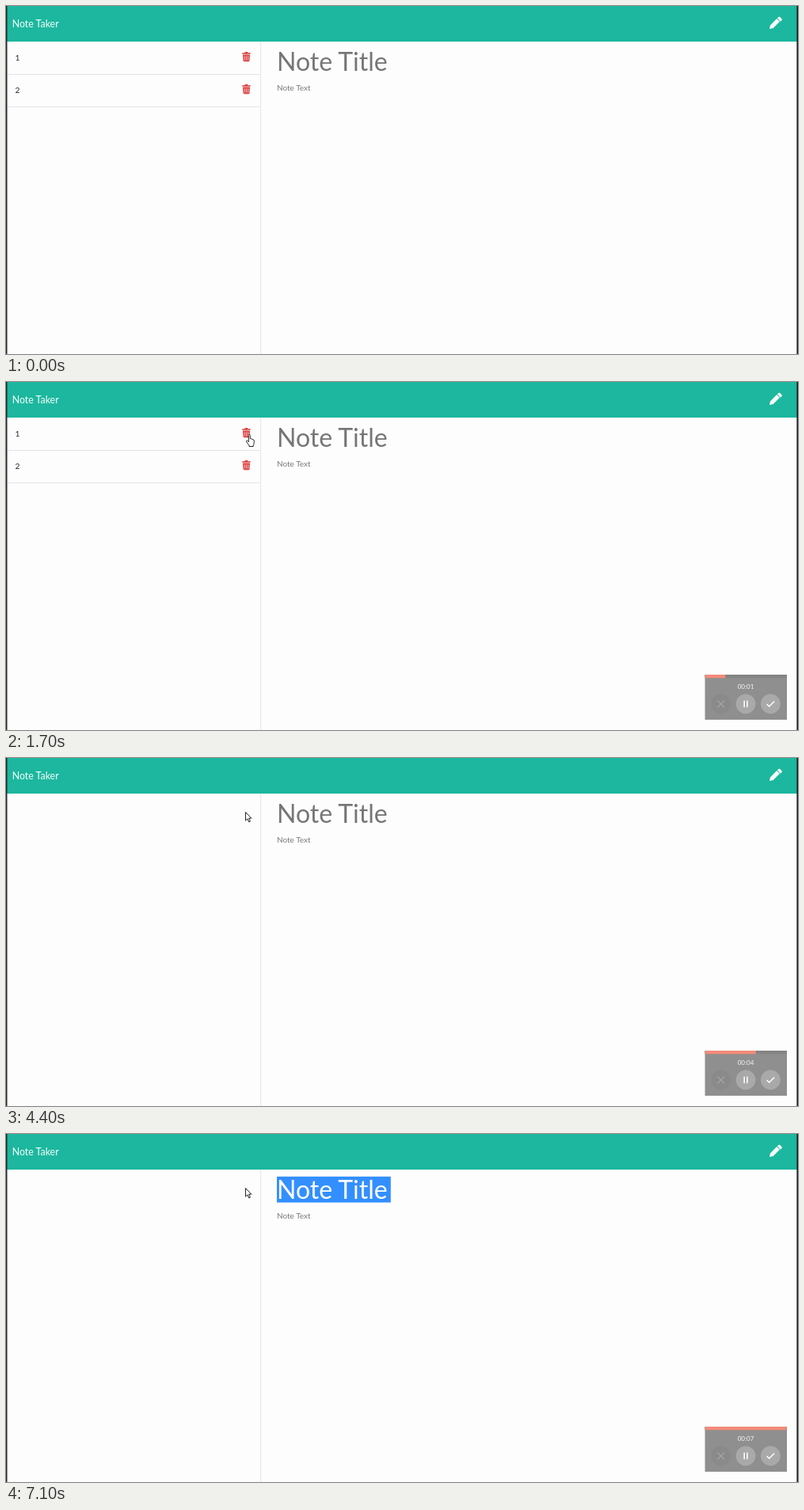
Animation, 1000 px wide and 440 px high, one loop 7.2 s. Source, as an HTML page:

```html
<!DOCTYPE html>
<html lang="en">
<head>
<meta charset="utf-8">
<title>Note Taker</title>
<style>
  html, body { margin: 0; width: 100%; height: 100%; overflow: hidden; background: #fefdfe; }
  svg { display: block; width: 100vw; height: 100vh; }
  text { font-family: Lato, "Open Sans", sans-serif; }

  .brand { font-size: 12.4px; fill: #f4fffc; }
  .title { font-size: 32px; fill: #757677; }
  .body { font-size: 10px; fill: #77797b; }
  .item { font-size: 10.3px; fill: #25282c; }
  .time { font-size: 8px; fill: #f6f6f6; text-anchor: middle; }
  .rule { fill: #e3e4e8; }

  .anim { animation: 7.2s step-end infinite; }
  .first { animation-name: first; }
  .second { animation-name: second; }
  .plain { animation-name: plain; }
  .marked { animation-name: marked; }
  .panel { animation-name: panel; }
  .pointer { animation-name: pointer; }
  .arrow { animation-name: arrow; }
  .hand { animation-name: hand; }
  .ticks { animation-name: ticks; }
  .bar { animation: bar 7.2s steps(72) infinite; transform-origin: 883px 0; }

  @keyframes first { 0% { opacity: 1 } 38.889%, 100% { opacity: 0 } }
  @keyframes second {
    0% { opacity: 1; transform: translateY(41px) }
    38.889% { opacity: 1; transform: none }
    59.722%, 100% { opacity: 0; transform: none }
  }
  @keyframes plain { 0% { opacity: 1 } 62.5%, 100% { opacity: 0 } }
  @keyframes marked { 0% { opacity: 0 } 62.5%, 100% { opacity: 1 } }
  @keyframes panel { 0% { opacity: 0 } 2.778%, 100% { opacity: 1 } }
  @keyframes pointer {
    0% { transform: translate(290px, 22px) }
    12.5% { transform: translate(290px, 22px); animation-timing-function: steps(6) }
    20.833%, 100% { transform: translate(302px, 68px) }
  }
  @keyframes arrow {
    0% { opacity: 0 }
    4.167% { opacity: 1 }
    20.833% { opacity: 0 }
    59.722%, 100% { opacity: 1 }
  }
  @keyframes hand {
    0% { opacity: 0 }
    20.833% { opacity: 1 }
    59.722%, 100% { opacity: 0 }
  }
  @keyframes bar { from { transform: scaleX(.008) } to { transform: scaleX(1.008) } }
  @keyframes ticks {
    0% { transform: none }
    13.889% { transform: translateY(-20px) }
    27.778% { transform: translateY(-40px) }
    41.667% { transform: translateY(-60px) }
    55.556% { transform: translateY(-80px) }
    69.444% { transform: translateY(-100px) }
    83.333% { transform: translateY(-120px) }
    97.222%, 100% { transform: translateY(-140px) }
  }
</style>
</head>
<body>
<svg viewBox="0 0 1000 440" preserveAspectRatio="none">
  <defs>
    <g id="trash">
      <path fill="#df3f3f" d="M298.2 59.2h3.1l.7-1.2h2.9l.7 1.2h3.1v1.6h-10.5z M299 61.6h9l-.6 7.4q-.1 1.2-1.2 1.2h-5.4q-1.1 0-1.2-1.2z"/>
      <path stroke="#fbdcdc" stroke-width=".8" d="M301.3 63.2v5.4M303.5 63.2v5.4M305.7 63.2v5.4"/>
    </g>
    <clipPath id="slot"><rect x="915" y="378" width="38" height="13"/></clipPath>
  </defs>

  <rect width="1000" height="440" fill="#fefdfe"/>
  <rect width="1000" height="45" fill="#1cb79e"/>
  <text class="brand" x="7.7" y="26.5">Note Taker</text>
  <path fill="#f6fffc" d="M964 29l.9-4.6 8.3-8.3 3.7 3.7-8.3 8.3z M974 15.2l1.1-1.1q1.1-1 2.2 0l2 2q1 1.1 0 2.2l-1.5 1.4z"/>

  <rect class="rule" x="321.2" y="45" width="1" height="395"/>

  <g class="anim first">
    <text class="item" x="11.6" y="69.3">1</text>
    <use href="#trash"/>
    <rect class="rule" x="2" y="86" width="319" height="1"/>
  </g>
  <g class="anim second">
    <text class="item" x="11.6" y="69.3">2</text>
    <use href="#trash"/>
    <rect class="rule" x="2" y="86" width="319" height="1"/>
  </g>

  <text class="title anim plain" x="342" y="81.8">Note Title</text>
  <g class="anim marked">
    <rect x="342" y="53.8" width="143.8" height="32.8" fill="#338fff"/>
    <text class="title" x="342" y="81.8" style="fill:#fff">Note Title</text>
  </g>
  <text class="body" x="342" y="106.8">Note Text</text>

  <g class="anim panel">
    <rect x="882.5" y="370" width="103.5" height="57" fill="#8f8f8f"/>
    <rect x="882.5" y="370" width="103.5" height="4.3" fill="#848484"/>
    <rect class="bar" x="883" y="370" width="103" height="4.3" fill="#f38b79"/>
    <g clip-path="url(#slot)"><g id="ticks" class="anim ticks"></g></g>
    <circle cx="902.8" cy="407" r="12.4" fill="#8a8a8a"/>
    <circle cx="934" cy="407" r="12.4" fill="#a9a9a9"/>
    <circle cx="965.3" cy="407" r="12.4" fill="#a9a9a9"/>
    <g fill="none" stroke-width="1.5">
      <path stroke="#aaa" stroke-width="1.1" d="M898.4 402.6l8.8 8.8M907.2 402.6l-8.8 8.8"/>
      <path stroke="#fff" d="M932.2 402.8v8.4M935.9 402.8v8.4"/>
      <path stroke="#fff" d="M960.5 407.2l3.1 3.1 6.5-6.6"/>
    </g>
  </g>

  <g class="anim arrow">
    <path class="anim pointer" fill="#fff" stroke="#222" stroke-width="1" stroke-linejoin="round"
      d="M.5.5v10.6l2.4-2.2 1.8 4 1.7-.8-1.8-3.9h3.2z"/>
  </g>
  <path class="anim hand" fill="#fff" stroke="#222" stroke-width="1" stroke-linejoin="round"
    d="M306.3 75.8v-8.2q0-1.2 1-1.2t1 1.2v4.2q1.4-.6 1.8.5 1.3-.5 1.6.6 1.5-.3 1.5 1.2v2.7q0 1.8-1 3v1.7h-5.2v-1.6q-1.5-1.5-3.4-4.2-.6-1 .2-1.5.8-.4 1.6.5z"/>

  <rect width="1.5" height="440" fill="#24262b"/>
  <rect x="998.4" width="1.6" height="440" fill="#1d1e24"/>
</svg>
<script>
  const ticks = document.getElementById('ticks');
  for (let s = 0; s < 8; s++) {
    const label = document.createElementNS(ticks.namespaceURI, 'text');
    label.setAttribute('class', 'time');
    label.setAttribute('x', 934);
    label.setAttribute('y', 387.7 + s * 20);
    label.textContent = '00:0' + s;
    ticks.append(label);
  }
</script>
</body>
</html>
```
